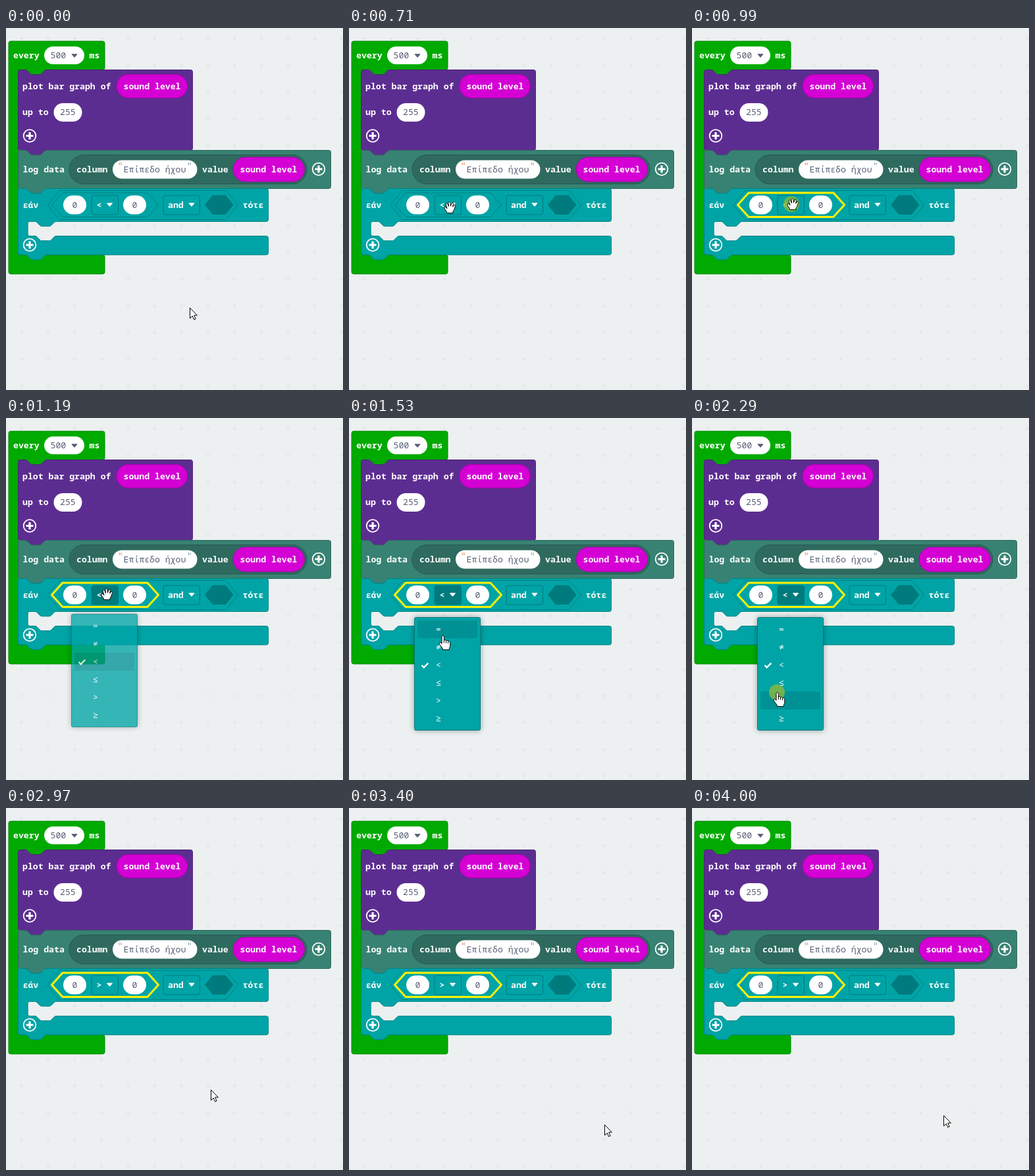
These frames come from a looping animation (512x549 px, 4.13 s). An HTML page:

```html
<!DOCTYPE html>
<html lang="el">
<head>
<meta charset="utf-8">
<title>Block editor</title>
<style>
html, body { margin: 0; width: 100%; height: 100%; overflow: hidden; background: #ecf0f1; }
svg { display: block; }
text { font: 13.2px "Noto Sans Mono", "DejaVu Sans Mono", monospace; fill: #fff; }
.b { font-weight: 700; }
.field { fill: #575e75; }
#menu { filter: drop-shadow(0 0 4px rgba(0,0,0,.35)); }
</style>
</head>
<body>
<svg id="stage" width="512" height="549" viewBox="0 0 512 549"></svg>
<script>
(() => {
const stage = document.getElementById('stage');

function el(tag, attrs, parent = stage) {
  const node = document.createElementNS('http://www.w3.org/2000/svg', tag);
  for (const key in attrs) node.setAttribute(key, attrs[key]);
  return parent.appendChild(node);
}
function text(str, x, y, cls = 'b', parent = stage) {
  const node = el('text', { x, y, class: cls }, parent);
  node.textContent = str;
  return node;
}
const path = (d, fill, stroke = 'none', parent = stage) =>
  el('path', { d, fill, stroke, 'stroke-linejoin': 'round' }, parent);
const box = (x, y, r, b, rx, fill, stroke = 'none', parent = stage) =>
  el('rect', { x, y, width: r - x, height: b - y, rx, fill, stroke }, parent);
const pill = (x, y, r, b, fill = '#fff', stroke = 'none') => box(x, y, r, b, (b - y) / 2, fill, stroke);
const arrow = (x, y, fill) => path(`M${x - 4} ${y - 2.2}h8l-4 4.6z`, fill, fill);

function hex(x, y, r, b, cut) {
  const m = (y + b) / 2;
  return `M${x} ${m}L${x + cut} ${y}H${r - cut}L${r} ${m}L${r - cut} ${b}H${x + cut}Z`;
}

// Connector bump, drawn rightwards (s = 1) or leftwards (s = -1)
const notch = s => `c${1.8 * s} 0 ${2.7 * s} .9 ${3.6 * s} 1.8l${3.6 * s} 3.6` +
  `c${.9 * s} .9 ${1.8 * s} 1.8 ${3.6 * s} 1.8h${10.8 * s}` +
  `c${1.8 * s} 0 ${2.7 * s} -.9 ${3.6 * s} -1.8l${3.6 * s} -3.6` +
  `c${.9 * s} -.9 ${1.8 * s} -1.8 ${3.6 * s} -1.8`;
const R = 3;
const arc = (dx, dy, sweep = 1) => `a${R} ${R} 0 0 ${sweep} ${dx} ${dy}`;

const topEdge = (x, y, r, notched) =>
  `M${x} ${y + R}${arc(R, -R)}` + (notched ? `H${x + 10.8}${notch(1)}` : '') + `H${r - R}${arc(R, R)}`;
const bottomEdge = (x, b, r, notched) =>
  `V${b - R}${arc(-R, R)}` + (notched ? `H${x + 43.2}${notch(-1)}` : '') + `H${x + R}${arc(-R, -R)}Z`;
function mouth(x, y, b, r) {
  const m = x + 14.6;
  return `V${y - R}${arc(-R, R)}H${m + 43.2}${notch(-1)}H${m + R}${arc(-R, R, 0)}` +
    `V${b - R}${arc(R, R, 0)}H${m + 10.8}${notch(1)}H${r - R}${arc(R, R)}`;
}
function plus(x, y) {
  el('circle', { cx: x, cy: y, r: 9.3, fill: 'none', stroke: '#fff', 'stroke-width': 1.8 });
  el('path', { d: `M${x - 5.5} ${y}h11M${x} ${y - 5.5}v11`, stroke: '#fff', 'stroke-width': 3.2 });
}
function sound(x, y, r, b, base) {
  pill(x, y, r, b, '#d400d4', '#aa00aa');
  text('sound level', x + 10.5, base);
}

// Workspace grid
let grid = '';
for (let x = 23.5; x < 512; x += 40.5)
  for (let y = 16.5; y < 549; y += 40.5) grid += `M${x - 3} ${y}h6M${x} ${y - 3}v6`;
path(grid, 'none', '#dee3e4');

// every 500 ms
path(topEdge(4, 20, 150) + mouth(4, 63.3, 344, 150) + bottomEdge(4, 373, 150), '#00aa00', '#008800');
text('every', 11, 46);
pill(58, 28, 119, 55);
text('500', 67.5, 46, 'field');
arrow(104, 42, '#575e75');
text('ms', 126.5, 46);

// plot bar graph
path(topEdge(18.5, 63.5, 283.5, true) + bottomEdge(18.5, 185.5, 283.5, true), '#5c2d91', '#4a2474');
text('plot bar graph of', 25, 93);
sound(168, 70.5, 275.5, 106, 93);
text('up to', 25, 132);
pill(72.5, 114, 115.5, 142);
text('255', 82, 132, 'field');
plus(36, 163.5);

// log data
path(topEdge(18.5, 185.5, 493.5, true) + bottomEdge(18.5, 243.5, 493.5, true), '#388273', '#2d685c');
text('log data', 25.5, 218.7);
pill(96, 192.5, 457, 236.5, '#2f6a5f', '#265750');
text('column', 107, 218.7);
pill(162, 200.5, 290.5, 228.5);
text('Επίπεδο ήχου', 178.5, 218.7, 'field');
path('M172.3 204v4M175 204v4', 'none', '#e0825a');
path('M277.5 204v4M280.2 204v4', 'none', '#7f9cae');
text('value', 298, 218.7);
sound(345, 196, 453.5, 233, 218.7);
plus(475, 214);

// if ... then
const TEAL = '#00a4a6', DARK = '#007b7d', EDGE = '#008385';
path(topEdge(18.5, 243.5, 398.5, true) + mouth(18.5, 293.5, 315.5, 398.5) +
  bottomEdge(18.5, 344, 398.5, true), TEAL, EDGE);
text('εάν', 25.5, 273);
path(hex(63, 246.5, 352.5, 290.5, 18), TEAL, EDGE);
const compare = path(hex(69.5, 250, 231.5, 286.5, 16.5), TEAL, EDGE);
pill(87, 254, 122, 282.5);
text('0', 100.5, 273, 'field');
const opBox = box(130, 254, 170.5, 283, 3, TEAL, DARK);
const opText = text('<', 137.5, 273);
arrow(157.5, 268, '#fff');
pill(178, 254, 213, 282.5);
text('0', 191.5, 273, 'field');
box(239, 254, 294.5, 283, 3, TEAL, DARK);
text('and', 246, 273);
arrow(282, 268, '#fff');
path(hex(302.5, 254, 345, 282.5, 11.5), DARK, DARK);
text('τότε', 359.5, 273);
plus(36, 329);

// Operator menu
const ROW = 27, FIRST = 307;
const menu = el('g', { id: 'menu' });
box(99.5, 302.5, 199.5, 473.5, 2, TEAL, DARK, menu);
const hover = box(104, 0, 195, ROW, 0, '#009194', 'none', menu);
[...'=≠<≤>≥'].forEach((op, i) => text(op, 132, FIRST + 17.8 + i * ROW, '', menu));
el('path', { d: 'M110.5 375l3.2 3.3 6.6-6.6', fill: 'none', stroke: '#fff', 'stroke-width': 2.4 }, menu);

// Pointers, drawn around their hot spot
const click = el('circle', { r: 12, fill: '#8cb83c', 'fill-opacity': .8 });
const shapes = {
  arrow: 'M.5 .5V16.3L4.2 12.8 6.7 18.3 9.1 17.2 6.6 11.8H11.4Z',
  finger: 'M-2 1.8C-2-.4 1.4-.4 1.4 1.8V7.2C2 6 4.2 6.4 4.5 7.8 5.2 6.8 7.3 7.2 7.5 8.6 9 8 10.8 9 10.8 10.8V15' +
    'C10.8 17.5 9 18.5 9 21.5H-.2C-.2 19-3.2 17-5.6 12.8-6.6 10.8-4.4 9.6-3.2 11L-2 12.4Z',
  grab: 'M-3 8.5C-4 5.5-7 2.5-7.3.8-7.3-1-5.2-1-4.2.3L-3 1.8-4.8-4.2C-5.2-6.2-2.8-7-2-5L-.7-1.5-1-6.6' +
    'C-1-8.8 1.7-8.8 2-6.8L2.4-1.8 3.8-6C4.4-7.8 6.8-7 6.4-5L5.6-.8 7.2-3.2C8.4-4.6 10-3.2 9.4-1.7 8 2 8.2 4 5.8 6.5V8.8Z'
};
const pointers = {};
for (const kind in shapes) {
  pointers[kind] = el('g', {});
  path(shapes[kind], '#fff', '#000', pointers[kind]);
}
path('M1.4 7v4M4.5 8v3.5M7.5 9v3', 'none', '#000', pointers.finger);

// Pointer strokes: quadratic curves through a bend
const moves = [
  { at: 0, until: 570, from: [279, 424], bend: [185, 375], to: [151, 279] },
  { at: 640, until: 920, from: [152, 273], bend: [152, 270], to: [152, 267] },
  { at: 1190, until: 1740, from: [152, 267], bend: [146, 325], to: [130, 398] },
  { at: 1740, until: 2090, from: [130, 398], bend: [130, 407], to: [130, 416] },
  { at: 2620, until: 3190, from: [129, 416], bend: [309, 383], to: [385, 487] },
  { at: 3190, until: 3470, from: [385, 487], bend: [392, 496], to: [386, 468] },
  { at: 3730, until: 4000, from: [386, 468], bend: [384, 467], to: [381, 465] }
];
function position(t) {
  const { at, until, from, bend, to } = moves.filter(m => m.at <= t).pop();
  const p = Math.min(1, (t - at) / (until - at)), q = 1 - p;
  return from.map((v, i) => Math.round(q * q * v + 2 * q * p * bend[i] + p * p * to[i]));
}

// The screen refreshes every 70 ms, counted from the start of each burst
const STEP = 70, PRESS = 990, OPEN = 1120, PICK = 2290, CLOSE = 2420;
const bursts = [0, 640, OPEN, 1740, PICK, CLOSE, 2690, 3260, 3800];
function refresh(time) {
  const begin = bursts.filter(b => b <= time).pop();
  return begin + Math.floor((time - begin) / STEP) * STEP;
}

const show = (node, on) => node.setAttribute('visibility', on ? 'visible' : 'hidden');

function draw(time) {
  const t = refresh(time);
  // The pointer leaves its resting place only once the next burst begins
  const [x, y] = position(t >= CLOSE && t < 2690 ? CLOSE : t);
  const kind = t < 640 || t >= CLOSE ? 'arrow' : y < 302 ? 'grab' : 'finger';
  for (const name in pointers) show(pointers[name], name === kind);
  pointers[kind].setAttribute('transform', `translate(${x} ${y})`);

  show(click, (t >= PRESS && t < OPEN) || (t >= PICK && t < CLOSE));
  click.setAttribute('cx', x - 1);
  click.setAttribute('cy', y);

  const selected = t >= PRESS, open = t >= OPEN && t < CLOSE;
  compare.setAttribute('stroke', selected ? '#fff200' : EDGE);
  compare.setAttribute('stroke-width', selected ? 3 : 1);
  opBox.setAttribute('fill', open ? DARK : TEAL);
  opText.textContent = t >= CLOSE ? '>' : '<';

  show(menu, open);
  const left = Math.min(1, Math.max(0, 1 - (t - OPEN + STEP) / 250));
  menu.setAttribute('opacity', 1 - left ** 1.8);
  menu.setAttribute('transform', `translate(0 ${-Math.round(20 * left ** 1.7)})`);
  const row = kind === 'finger' ? Math.max(0, Math.floor((y - FIRST) / ROW)) : 2;
  hover.setAttribute('y', FIRST + row * ROW);
}

const LOOP = 4130, start = performance.now();
function frame() {
  draw((performance.now() - start) % LOOP);
  requestAnimationFrame(frame);
}
frame();
})();
</script>
</body>
</html>
```
